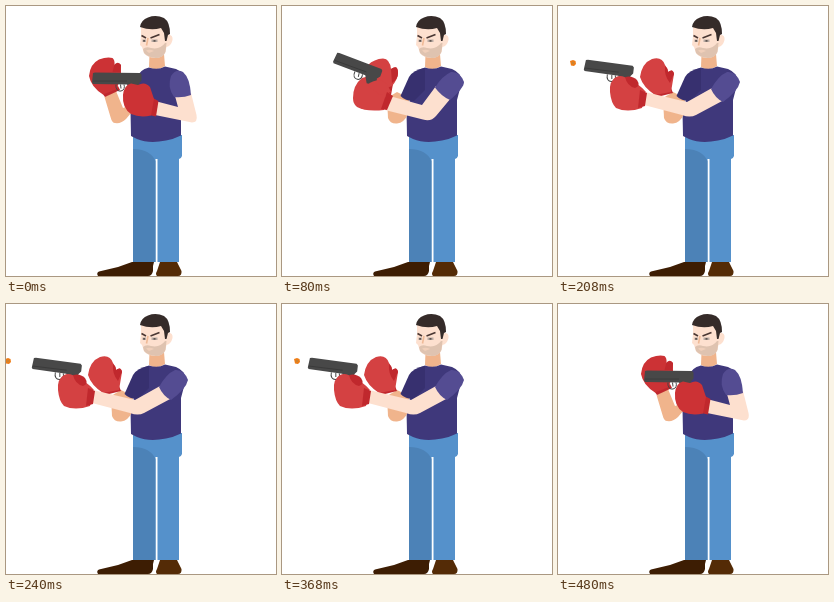
Write an HTML page that moves like this. It is 270 px wide and 270 px high and loops after 0.56 s.

```html
<!DOCTYPE html>
<html lang="en">
<head>
<meta charset="utf-8">
<title>Boxer with pistol</title>
<style>
html, body { margin: 0; width: 100%; height: 100%; overflow: hidden; background: #fff; }
svg { display: block; width: 100vw; height: 100vh; }
.skin { fill: #fde0cf; }
.tan { fill: #f0b48c; }
.shirt { fill: #3f387b; }
.shade { fill: #37306f; }
.sleeve { fill: #544c92; }
.red { fill: #d44142; }
.deep { fill: #c0282d; }
.gun { fill: #484848; }
.pose { visibility: hidden; }
.guard .red { fill: #cc3235; }
</style>
</head>
<body>
<svg viewBox="0 0 270 270">
  <defs>
    <g id="pistol">
      <path class="gun" d="M1 .5 L3 0 L48 .5 L49.500 2 L49.500 8 L47 11 L49 18 L39 19 L35 12 L1 11.500 L0 10 Z"/>
      <path d="M1 8.500H35" stroke="#393939" stroke-width=".8"/>
      <path d="M24 12 C23.500 17 26 19 29 18.500 C32 18 33 15 32 12 M28.500 12 L29 16" fill="none" stroke="#444" stroke-width="1"/>
    </g>
    <g id="farArm">
      <path class="tan" d="M105 92 L115 86 L127 92 L126 108 Q122 117 115 117.500 Q108 118 106 112 Z"/>
      <path class="shade" d="M143 62 Q131 64 127 71 L118.500 90 Q123 95 132 95 L143 84 Z"/>
    </g>
  </defs>

  <g id="legs">
    <path fill="#3d1d03" d="M126 256 H148 L147 260 V265 Q146 270 142 270 H92 Q90 267 93 265.500 L112 261 Z"/>
    <path fill="#542b06" d="M154 256 H171 L175.500 265 Q176 270 172 270 H151 Q149 268 151 265 Z"/>
    <path fill="#5591cb" d="M127 129 H176 V150 Q175 153 173 153 V256 H151.500 V153 H149.500 V256 H127 Z"/>
    <path fill="#4c82b7" d="M127 143 Q144 143 149.500 155 V256 H127 Z"/>
  </g>

  <path class="tan" d="M143.500 48 H158 L159 60 Q151 66 143 61 Z"/>
  <path class="shirt" d="M143 61.500 Q152 64.500 159 60.500 L170 63 Q178 66 180 75 L175 94 V129.500 Q168 133 160 134.500 Q143 138 131 133 L125 130 L124.500 104 L130 89 L131 72 Q133 64 143 61.500 Z"/>

  <g id="head">
    <path class="skin" d="M135 20 H162 L163 29 Q167 29 166.500 34 Q165 40 160.500 41 L159 47 Q156 52 149 52 Q141 51.500 138 47 L136 41 L134 39 L135 30 Z"/>
    <path fill="#dfc3b0" d="M137 43 Q140 40 145 42 Q154 44 159 37 H160.500 L159.500 46 Q157 52 150 52 Q142 51.500 138 47 Z"/>
    <path fill="#f0cfba" d="M140 44.500 Q144 43 148 45 L143 47 Z"/>
    <path fill="#352b29" d="M134 21 Q135 14 142 11.500 Q150 8.500 158 12 Q164 16 164 28 L162 29 L160.500 35 H159 L158 27 L155 22 Q145 25 134 21 Z"/>
    <g fill="none">
      <path stroke="#4a3733" stroke-width="1.600" d="M135.500 29.500 L140 32 M144.500 32 L153.500 28.500"/>
      <path stroke="#b9aaa3" stroke-width="2.600" d="M136.500 34.800 H140 M145.500 34.800 H151.500"/>
      <path stroke="#5f5551" stroke-width="1.800" d="M137.200 34.800 H139 M147.500 34.800 H149.500"/>
      <path stroke="#efb996" stroke-width="1.600" d="M142 32 L140.500 39.500"/>
    </g>
  </g>

  <g class="pose guard">
    <path class="tan" d="M98.500 91 L110 85 L117 102 L125 99 V107 L120 113 Q115 118 109 117 Q106 117 104.500 111 Z"/>
    <path class="deep" d="M96 87 L112 80 L114 84 L99 91 Z"/>
    <path class="red" d="M97 88.500 Q85 81 83 70 Q84 58 93 53.500 Q101 50.500 106.500 52 Q109 54 108.500 59 Q112 56 115 59 L115 67 L111 83 Z"/>
    <path class="deep" d="M108.500 58.500 Q112 55 115 59 L114 66 H106.500 Z"/>
    <use href="#pistol" x="86" y="66.500"/>
    <path class="skin" d="M149 95 L172 101 L169 90 L185 87 L190.500 109 Q192 116.500 186 116.500 L149 109 Z"/>
    <path class="sleeve" d="M165 70 Q170 62 177 66 Q184 72 185 89 Q177 92 168 91 Q161 81 165 70 Z"/>
    <path class="deep" d="M145 91 L152.500 95 L150 110.500 L143 109 Z"/>
    <path class="red" d="M148 93 L145 109.500 Q134 112 125 108 Q116 102 117 89 Q118 79 125 77.500 L132 79 Q139 75 144 81 Z"/>
  </g>

  <g class="pose">
    <use href="#farArm"/>
    <path class="deep" d="M99 76 L111 78 L109 89 L96 89 Z"/>
    <path class="red" d="M86 59 Q92 53 101 52.500 Q108 53 109 63 Q116 58 116 67 Q116 73 110 80 L98 85 L83 78 Z"/>
    <path class="red" d="M71 92 Q71 79 80 72 Q93 67 101 76 L108 88 L102 104 Q84 106 75 101 Q71 98 71 92 Z"/>
    <use href="#pistol" transform="translate(54.500 46) rotate(20)"/>
    <path class="red" d="M85 79 Q91 74 99 74 L105 78 L109 86 L98 89 Z"/>
    <path class="deep" d="M109 63 Q116 58 116 67 Q116 73 110 77 Z"/>
    <path class="skin" d="M104 89 L140 99 L154 80 L169 92 L154 110 Q149 116 141 113.500 L103 104 Z"/>
    <path class="sleeve" d="M153 81.500 Q160 70 169 66 Q178 65 182 76 Q182 82 168 94 Q159 90 153 81.500 Z"/>
    <path class="deep" d="M105 86 L111 90 L105 104 L99 103 Z"/>
  </g>

  <g class="pose">
    <use href="#farArm"/>
    <path class="deep" d="M96 86 L113 82 L115 87 L99 91 Z"/>
    <path class="red" d="M97 89 Q85 81 82 71 Q84 57 94 53 Q104 50 107 59 Q110 63 110 66 Q115 62 116 68 L113 86 Z"/>
    <path class="deep" d="M107 60 Q110 62 110 66 Q115 62 116 68 L112 77 Q106 70 107 60 Z"/>
    <use href="#pistol" transform="translate(27 53.500) rotate(7)"/>
    <path class="red" d="M52 86 Q51 75 58 71 Q64 68 71 74 Q79 76 88 86 L84 102 Q69 107 58 102 Q53 97 52 86 Z"/>
    <path class="deep" d="M67 71 Q74 69 79 74 Q83 80 77 82 Q69 80 67 71 Z"/>
    <path class="skin" d="M87 86 L129 96 L154 82 L166 94 L138 109 Q132 112 124 109 L86 99 Z"/>
    <path class="sleeve" d="M153 83 Q160 70 169 66 Q178 65 182 76 Q180 85 165 96 Q157 92 153 83 Z"/>
    <path class="deep" d="M82 84 L89 87 L87 100 L80 102 Z"/>
  </g>

  <g id="bullet" class="pose">
    <path fill="#ef7d16" d="M-3 -2 L0 -3 L2.500 -2 L3 1 L1 3 L-2 2.500 Z"/>
    <circle r="1.200" fill="#c98534"/>
  </g>
</svg>
<script>
const STEP = 80;
// Pose index and bullet x for each step; null hides the bullet.
const steps = [
  [0, null], [1, null], [2, 15], [2, 2], [2, 15], [1, null], [0, null]
];
const poses = [...document.querySelectorAll(".pose:not(#bullet)")];
const bullet = document.getElementById("bullet");
const show = (el, on) => { el.style.visibility = on ? "visible" : "hidden"; };

function draw() {
  const i = Math.floor(performance.now() / STEP) % steps.length;
  const [pose, x] = steps[i];
  poses.forEach((el, k) => show(el, k === pose));
  show(bullet, x !== null);
  if (x !== null) bullet.setAttribute("transform", `translate(${x} 57)`);
  requestAnimationFrame(draw);
}
draw();
</script>
</body>
</html>
```
